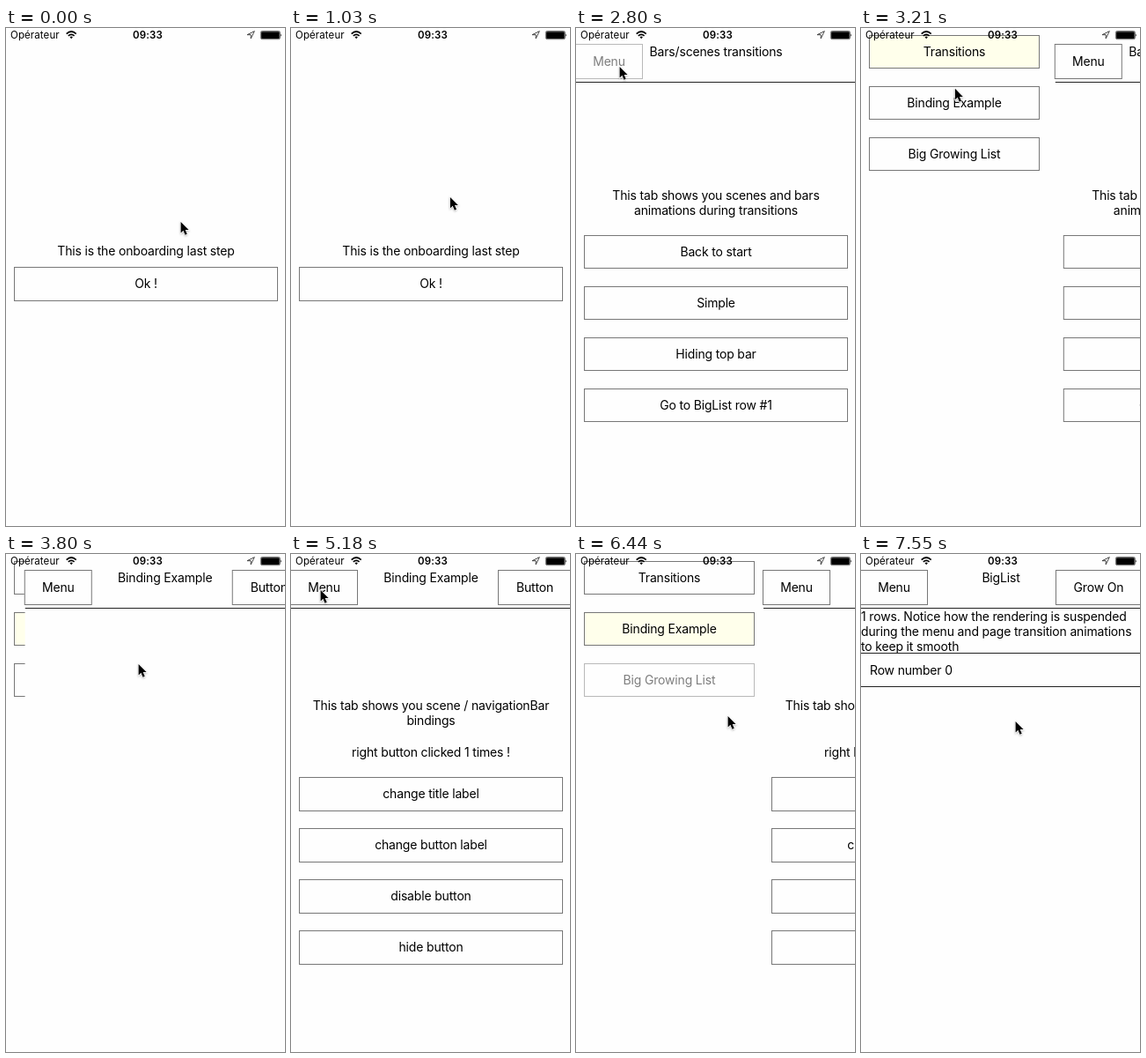
These frames come from a looping animation (317 px wide and 565 px high, 8 s). An HTML page:

```html
<!DOCTYPE html>
<html lang="en">
<head>
<meta charset="utf-8">
<title>Navigation demo</title>
<style>
html, body { margin: 0; width: 100%; height: 100%; overflow: hidden; background: #fefefe; }
#stage { position: absolute; left: 0; top: 0; width: 317px; height: 565px; overflow: hidden;
  font: 14px/17px Inter, sans-serif; letter-spacing: -.17px; color: #000; background: #fefefe; }
#stage div, #stage svg { position: absolute; box-sizing: border-box; }
.layer { left: 0; top: 0; width: 317px; height: 565px; background: #fefefe; }
.text { white-space: pre; text-align: center; margin-top: -1px; }
.button { display: flex; align-items: center; justify-content: center; border: 1px solid #777;
  white-space: pre; background: #fefefe; padding-bottom: 2px; }
.rule { left: 0; width: 317px; height: 1px; background: #222; }
#nav { left: 0; top: 0; width: 317px; height: 62px; background: #fefefe; }
#status { left: 0; top: 0; width: 317px; height: 17px; font-size: 11.5px; letter-spacing: .1px; }
</style>
</head>
<body>
<div id="stage">
  <div id="menu" class="layer"></div>
  <div id="drawer" class="layer">
    <div id="intro" class="layer"></div>
    <div id="scene" class="layer"></div>
    <div id="nav"></div>
  </div>
  <div id="status">
    <div style="left:5px">Opérateur</div>
    <div style="left:111px;width:100px;text-align:center;font-weight:600;letter-spacing:.2px">09:33</div>
    <svg width="317" height="17" fill="none" stroke="#000">
      <g stroke-width="1.7">
        <path d="M68.7 6.6Q74.2 1.4 79.7 6.6M70.8 8.9Q74.2 5.8 77.6 8.9"/>
        <path d="M72.5 10.3Q74.2 8.9 75.9 10.3L74.2 12.3Z" fill="#000" stroke="none"/>
      </g>
      <path d="M282.3 3.6L274 7.7H278.2V12Z" stroke="#333" stroke-width=".9"/>
      <rect x="289.4" y="3.5" width="22" height="9.2" rx="1.8" stroke="#444" stroke-width=".8"/>
      <rect x="290.1" y="4.2" width="20.6" height="7.8" rx=".8" fill="#000" stroke="none"/>
      <path d="M312.3 6.4Q314 8.1 312.3 9.8Z" fill="#000" stroke="none"/>
    </svg>
  </div>
  <svg id="cursor" width="18" height="24" viewBox="-2 -2 18 24" style="left:-2px;top:-2px;filter:drop-shadow(0 1px 1px #0004)">
    <path transform="translate(.6 1) scale(.88)" d="M0 0V14.2L3.2 11.2L5.6 16.8L8.1 15.7L5.8 10.3H10.2Z"
      stroke="#fff" stroke-width="1.4" paint-order="stroke"/>
  </svg>
</div>
<script>
const LOOP = 8000;
const $ = id => document.getElementById(id);

function box(parent, cls, left, top, width, height, text = '') {
  const el = document.createElement('div');
  el.className = cls;
  el.textContent = text;
  const size = { left, top, width, height };
  for (const key in size) if (size[key] != null) el.style[key] = size[key] + 'px';
  parent.appendChild(el);
  return el;
}
const button = (parent, x, y, w, h, text) => box(parent, 'button', x, y, w, h, text);
const label = (parent, y, text) => box(parent, 'text', 0, y, 318, null, text);
const rule = (parent, y) => box(parent, 'rule', null, y);
const group = parent => box(parent, '', 0, 0, 317, 565);

// Scenes
label($('intro'), 245, 'This is the onboarding last step');
button($('intro'), 9, 271, 300, 39, 'Ok !');

const transitions = group($('scene'));
label(transitions, 181.5, 'This tab shows you scenes and bars\nanimations during transitions');
['Back to start', 'Simple', 'Hiding top bar', 'Go to BigList row #1']
  .forEach((text, i) => button(transitions, 9, 235 + 58 * i, 300, 38, text));

const binding = group($('scene'));
label(binding, 163.5, 'This tab shows you scene / navigationBar\nbindings');
label(binding, 217, 'right button clicked 1 times !');
['change title label', 'change button label', 'disable button', 'hide button']
  .forEach((text, i) => button(binding, 9, 253 + 58 * i, 300, 39, text));

const list = group($('scene'));
box(list, 'text', 0, 62.5, 317, null,
  '1 rows. Notice how the rendering is suspended\nduring the menu and page transition animations\nto keep it smooth')
  .style.textAlign = 'left';
rule(list, 112);
box(list, 'text', 10, 124, null, null, 'Row number 0');
rule(list, 150);

// Navigation bar and side menu
const title = label($('nav'), 18.5, '');
const menuButton = button($('nav'), -1, 18, 77, 40, 'Menu');
const rightButton = button($('nav'), 235, 18, 84, 40, '');
rule($('nav'), 61);
const items = ['Transitions', 'Binding Example', 'Big Growing List']
  .map((text, i) => button($('menu'), 9, 8 + 58 * i, 194, 38, text));

const pages = [
  { from: 0, shown: 1745, body: transitions, title: 'Bars/scenes transitions' },
  { from: 3623, shown: 4705, body: binding, title: 'Binding Example', action: 'Button', actionLeft: 235 },
  { from: 6490, shown: 7545, body: list, title: 'BigList', action: 'Grow On', actionLeft: 221 }
];

const drawerMoves = [[2910, 1], [3623, 0], [5370, 1], [6490, 0]];
const presses = [
  [menuButton, 2740, 2920], [items[1], 3430, 3570],
  [menuButton, 5235, 5370], [items[2], 6300, 6500]
];
const cursorPath = [
  [0, 198, 219], [390, 198, 219], [700, 145, 282], [885, 145, 282], [1085, 188, 171],
  [2190, 188, 171], [2700, 49, 43], [2990, 49, 43], [3390, 148, 86], [3570, 149, 88],
  [3730, 150, 124], [4920, 150, 124], [5160, 33, 40], [5560, 33, 40], [6100, 165, 145],
  [6350, 167, 150], [6435, 172, 183], [6500, 172, 183], [6560, 175, 189], [LOOP, 175, 189]
];

const clamp = v => Math.max(0, Math.min(1, v));
const smooth = p => p * p * (3 - 2 * p);

// Share of the way left to travel, s in seconds
function springLeft(s) {
  if (s <= 0) return 1;
  if (s > .62) return 0;
  return Math.exp(-11 * s) * (Math.cos(10.45 * s) + 1.053 * Math.sin(10.45 * s));
}
function dampedLeft(s, rate) {
  if (s <= 0) return 1;
  return s > .46 ? 0 : (1 + rate * s) * Math.exp(-rate * s);
}

function drawerX(t) {
  return 213 * drawerMoves.reduce((open, [start, goal]) =>
    t < start ? open : goal + (open - goal) * springLeft((t - start) / 1000), 0);
}

function cursorAt(t) {
  const i = cursorPath.findIndex(k => k[0] > t);
  const [t0, x0, y0] = cursorPath[i - 1], [t1, x1, y1] = cursorPath[i];
  const p = smooth((t - t0) / (t1 - t0));
  return [x0 + (x1 - x0) * p, y0 + (y1 - y0) * p];
}

function render(t) {
  const pushTime = (t - 1255) / 1000;
  const left = dampedLeft(pushTime, 20), pushed = 1 - left;
  $('intro').style.display = left ? '' : 'none';
  $('intro').style.transform = `translateX(${-95 * pushed}px) scale(${1 - .05 * pushed})`;
  $('intro').style.opacity = 1 - .7 * pushed;
  $('scene').style.transform = `translateX(${317 * left}px)`;
  $('nav').style.transform = `translateY(${-63 * dampedLeft(pushTime, 18)}px)`;
  $('drawer').style.transform = `translateX(${drawerX(t)}px)`;

  const current = pages.filter(p => t >= p.from).length - 1;
  const page = pages[current];
  pages.forEach(p => p.body.style.display = p === page && t >= p.shown ? '' : 'none');
  title.textContent = page.title;
  rightButton.textContent = page.action || '';
  rightButton.style.display = page.action ? '' : 'none';
  rightButton.style.left = page.actionLeft + 'px';
  rightButton.style.width = 319 - page.actionLeft + 'px';
  items.forEach((item, i) => item.style.background = i === current ? '#ffffeb' : '#fefefe');

  [menuButton, ...items].forEach(el => el.style.opacity = 1);
  for (const [el, down, up] of presses)
    if (t > down && t < up + 200)
      el.style.opacity = 1 - .5 * clamp((t - down) / 50) * (1 - clamp((t - up) / 150));

  const [x, y] = cursorAt(t);
  $('cursor').style.transform = `translate(${x}px, ${y}px)`;
}

const began = performance.now();
function tick() {
  render((performance.now() - began) % LOOP);
  requestAnimationFrame(tick);
}
tick();
</script>
</body>
</html>
```
